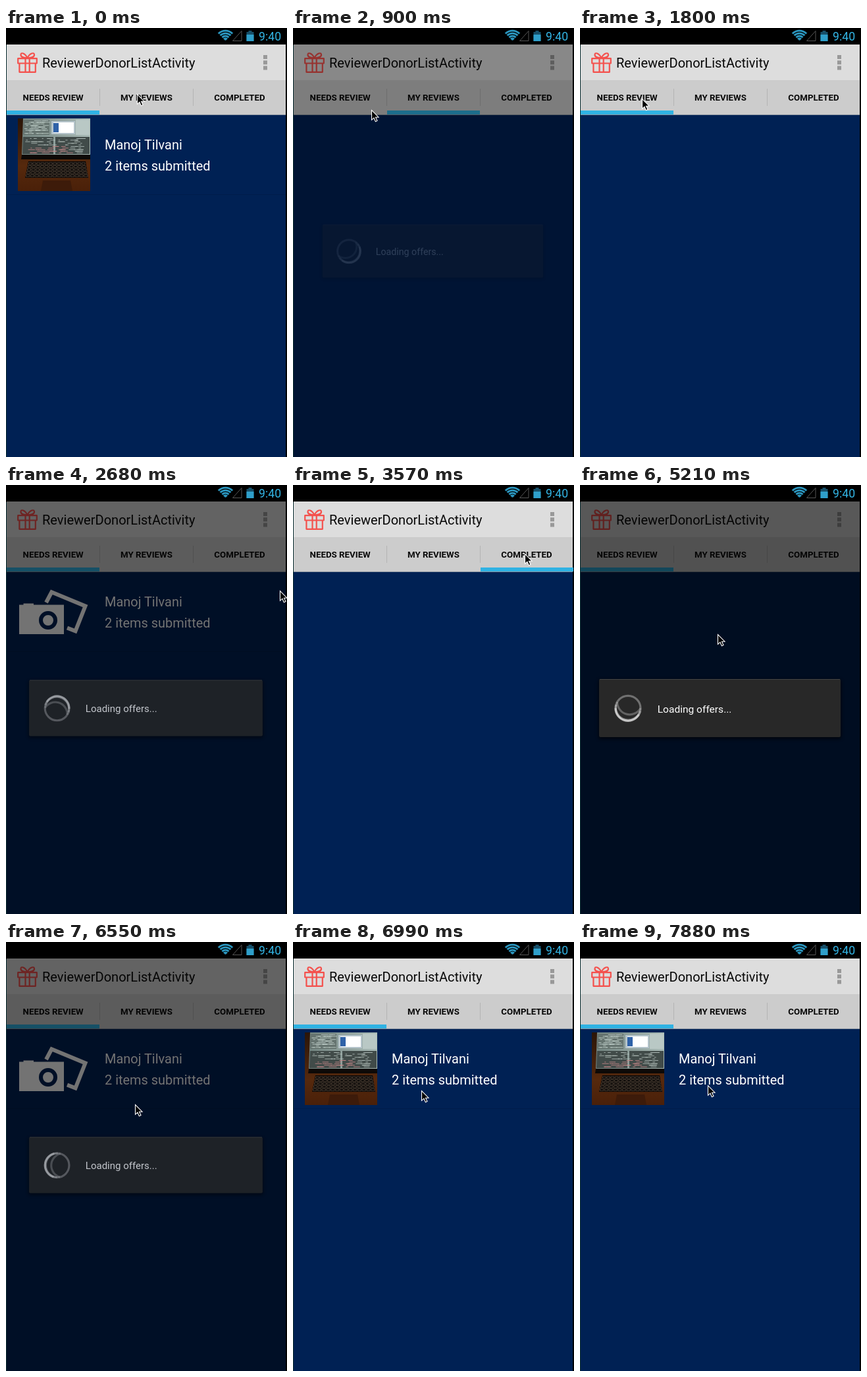
An HTML page that plays this animation: 427x650 px, repeating every 8 s.

```html
<!DOCTYPE html>
<html lang="en">
<head>
<meta charset="utf-8">
<title>Donor list</title>
<style>
  html, body { margin: 0; width: 100%; height: 100%; overflow: hidden; background: #000; }
  svg { display: block; width: 100vw; height: 100vh; font-family: Roboto, sans-serif; }
  .tab { font-size: 13.3px; font-weight: 700; text-anchor: middle; fill: #080808; }
  .row { font-size: 19.95px; fill: #fff; }
</style>
</head>
<body>
<svg viewBox="0 0 427 650">
  <defs>
    <linearGradient id="glow" x1="0" y1="0" x2="1" y2="0">
      <stop offset="0" stop-color="#728480"/>
      <stop offset="1" stop-color="#a9bab6"/>
    </linearGradient>
    <linearGradient id="desk" x1="0" y1="0" x2="0" y2="1">
      <stop offset="0" stop-color="#2a1508"/>
      <stop offset=".65" stop-color="#56290d"/>
      <stop offset="1" stop-color="#4a2009"/>
    </linearGradient>
    <filter id="soft" x="-5%" y="-15%" width="110%" height="130%">
      <feGaussianBlur stdDeviation="2.5"/>
    </filter>
    <clipPath id="thumb"><rect x="18" y="137" width="110" height="110"/></clipPath>
  </defs>

  <rect width="427" height="650" fill="#000"/>
  <rect y="26" width="1" height="624" fill="#0a2c30"/>
  <rect x="1" y="131" width="424" height="519" fill="#002154"/>

  <!-- status bar -->
  <g id="wifi" fill="none" stroke="#2b97c0"></g>
  <path d="M358 4.5V19.5H344.5Z" fill="none" stroke="#555"/>
  <path d="M365.5 6H368.5V4H373.5V6H376.5V20H365.5Z" fill="#17506a"/>
  <rect x="365.5" y="10" width="11" height="10" fill="#2f9fca"/>
  <text x="384" y="18.5" font-size="17.7" fill="#33b5e5">9:40</text>

  <!-- action bar and tabs -->
  <rect x="1" y="25" width="424" height="54" fill="#ddd"/>
  <rect x="1" y="79" width="424" height="52" fill="#ccc"/>
  <rect x="1" y="131" width="424" height="1" fill="#8b93a0"/>
  <g fill="none" stroke="#f4514d" stroke-width="2.2" stroke-linejoin="round">
    <path d="M18.2 46.2H46.8V53.5H18.2ZM20.4 53.5V66.8H44.8V53.5M29.5 46.2V66.8M35.7 46.2V66.8"/>
    <path d="M32.5 45.5C29 38 22 36 22.5 41C23 45 28 45 32.5 45.5C36 38 43.5 36 43 41C42.5 45 37 45 32.5 45.5"/>
  </g>
  <text x="55" y="59.5" font-size="20.05" fill="#080808">ReviewerDonorListActivity</text>
  <path d="M391 41h6v6h-6zM391 49.3h6v6h-6zM391 57.6h6v6h-6z" fill="#999"/>
  <path d="M142.5 92V118M284.5 92V118" stroke="#b3b3b3"/>
  <text class="tab" x="71.7" y="110">NEEDS REVIEW</text>
  <text class="tab" x="213.5" y="110">MY REVIEWS</text>
  <text class="tab" x="355" y="110">COMPLETED</text>
  <rect id="mark" y="125" width="141" height="6" fill="#30b2e3"/>

  <!-- list row -->
  <g id="row">
    <rect id="press" x="1" y="131" width="424" height="122" fill="#33b5e5" opacity=".4"/>
    <rect x="1" y="252" width="424" height="1" fill="#001d4b"/>
    <g id="camera">
      <path d="M61 178L69.3 162.3L120.5 183.5L105.5 221.3L93 216.5" fill="none" stroke="#fff" stroke-width="6"/>
      <path d="M20 181.5H26.5V179.5H42V181.5H88V226H20Z" fill="#fff"/>
      <circle cx="64" cy="205" r="11" fill="#fff" stroke="#002154" stroke-width="6"/>
    </g>
    <g id="photo" clip-path="url(#thumb)">
      <rect x="18" y="137" width="110" height="110" fill="url(#desk)"/>
      <path d="M26 137H128V192H24Z" fill="url(#glow)"/>
      <path d="M27 139H66V162H26Z" fill="#65736f"/>
      <path d="M106 139H127V162H106Z" fill="#b9c8c5"/>
      <path d="M26 165H72V191H25ZM75 165H127V191H75Z" fill="#414b49"/>
      <rect x="69" y="141" width="36" height="20" fill="#b5c4cb"/>
      <rect x="72" y="143" width="31" height="16" fill="#fff"/>
      <rect x="72" y="144" width="8" height="14" fill="#2f62a8"/>
      <g id="code"></g>
      <path d="M24 192H128V199H23Z" fill="#0d0907"/>
      <path d="M34 202H121L125 227H29Z" fill="#0b0807"/>
      <g id="keys" fill="none" stroke="#6b5a4a" stroke-width=".6"></g>
      <path d="M56 231H98L101 247H53Z" fill="#3d1b0a"/>
    </g>
    <text class="row" x="150" y="184">Manoj Tilvani</text>
    <text class="row" x="150" y="216">2 items submitted</text>
  </g>

  <rect id="dim" x="1" y="25" width="424" height="625" fill="#000"/>

  <g id="dialog">
    <rect x="28" y="295" width="369" height="90" rx="3" fill="#000" opacity=".6" filter="url(#soft)"/>
    <rect x="29" y="294" width="367" height="88" rx="2" fill="#282828"/>
    <path d="M30 294.5H395" stroke="#444"/>
    <circle cx="73" cy="338.3" r="19" fill="none" stroke="#707070" stroke-width="3.2"/>
    <g id="spin"></g>
    <text x="117.7" y="344.5" font-size="15.55" fill="#fff">Loading offers...</text>
  </g>

  <path id="cursor" d="M.5 .5V15.3L3.9 12.2L6.4 17.8L9 16.6L6.500 11.2H11Z" fill="#000" stroke="#fff" stroke-width="1.1"/>
</svg>
<script>
const $ = id => document.getElementById(id);
const LOOP = 8000, STEP = 148.5, LAST = 53;

// each load: first step, last step, tab, spinner angle offset
const loads = [
  { from: 1, to: 6, tab: 1, turn: 210 },
  { from: 12, to: 19, tab: 0, turn: 116 },
  { from: 24, to: 29, tab: 2, turn: 210 },
  { from: 33, to: 45, tab: 0, turn: 168 }
];

// step, x, y
const path = [
  [0, 199, 100], [1, 199, 100], [6, 119, 124], [7, 110, 116], [9, 94, 107], [12, 94, 107],
  [18, 416, 160], [20, 418, 150], [23, 352, 104], [24, 352, 104], [29, 99, 92],
  [31, 97, 104], [33, 97, 104], [35, 209, 226], [37, 203, 246], [44, 196, 246],
  [48, 194, 218], [49, 194, 217], [53, 194, 217]
];

function add(parent, tag, attrs) {
  const el = document.createElementNS("http://www.w3.org/2000/svg", tag);
  for (const k in attrs) el.setAttribute(k, attrs[k]);
  $(parent).append(el);
}

function arc(cx, cy, r, a, b) {
  const at = deg => {
    const q = deg * Math.PI / 180;
    return (cx + r * Math.cos(q)).toFixed(2) + " " + (cy + r * Math.sin(q)).toFixed(2);
  };
  return `M${at(a)}A${r} ${r} 0 0 1 ${at(b)}`;
}

let seed = 7;
const rand = () => (seed = seed * 16807 % 2147483647) / 2147483647;

function codeLine(x, y, fill) {
  add("code", "rect", { x, y, width: 2 + rand() * 10, height: 1, fill, opacity: .8 });
}

function build() {
  for (const r of [3, 7.3, 11.4, 15.4])
    add("wifi", "path", { d: arc(333.5, 19.5, r, 226, 314), "stroke-width": r < 4 ? 4 : 2.8 });

  for (let i = 0; i < 45; i++)
    codeLine(28 + rand() * 30, 140 + Math.floor(rand() * 9) * 2.4, "#c3d2ce");
  for (let i = 0; i < 80; i++) {
    const x = 27 + rand() * 88, y = 167 + Math.floor(rand() * 10) * 2.4;
    codeLine(x, y, y > 178 && x < 95 ? "#c8898a" : "#b3c0bc");
  }
  for (let r = 0; r < 5; r++) {
    const left = 34 - r, w = (87 + 2 * r) / 14;
    for (let i = 0; i < 14; i++)
      add("keys", "path", { d: `M${left + i * w + .5} ${204 + r * 4.6}h${w - 1.5}v3h${1.5 - w}z` });
  }
  // bright arc with faded ends
  for (const [span, op] of [[105, .3], [92, .4], [75, .6]])
    add("spin", "path", {
      d: arc(73, 338.3, 19, -span, span),
      fill: "none", stroke: "#e8e8e8", "stroke-width": 3.2, opacity: op
    });
}

function cursorAt(n) {
  const i = Math.max(1, path.findIndex(p => p[0] >= n));
  const [a, x0, y0] = path[i - 1], [b, x1, y1] = path[i];
  const k = (n - a) / (b - a);
  return [x0 + (x1 - x0) * k, y0 + (y1 - y0) * k];
}

// opacity, scale and dim of the dialog
function dialogAt(n, load) {
  if (!load || n > load.to || n === load.from) return [0, 1, 0];
  if (n === load.to) return [.18, .914, .39];
  if (n === load.to - 1) return [.76, .967, .55];
  if (n === load.from + 1) return [.65, .965, .45];
  return [1, 1, .6];
}

const show = (id, on) => $(id).setAttribute("display", on ? "inline" : "none");

function draw(t) {
  const n = Math.min(LAST, Math.floor(t / STEP));
  const load = loads.filter(l => l.from <= n).pop();
  const tab = load ? load.tab : 0;
  const loaded = !load || n >= load.to - 1;
  const photo = !load || n > load.to;

  $("mark").setAttribute("x", 1 + tab * 142);
  show("row", tab === 0 && loaded);
  show("photo", photo);
  show("camera", !photo);
  show("press", n === 52);

  const [alpha, scale, dim] = dialogAt(n, load);
  $("dim").setAttribute("opacity", dim);
  $("dialog").setAttribute("opacity", alpha);
  $("dialog").setAttribute("transform",
    `translate(212.5 338.3) scale(${scale}) translate(-212.5 -338.3)`);
  if (load) {
    const angle = load.turn - 31.5 * (n - load.from);
    $("spin").setAttribute("transform", `rotate(${angle} 73 338.3)`);
  }
  const [x, y] = cursorAt(n);
  $("cursor").setAttribute("transform", `translate(${Math.round(x)} ${Math.round(y)})`);
}

build();
const start = performance.now();
function tick() {
  draw((performance.now() - start) % LOOP);
  requestAnimationFrame(tick);
}
tick();
</script>
</body>
</html>
```
